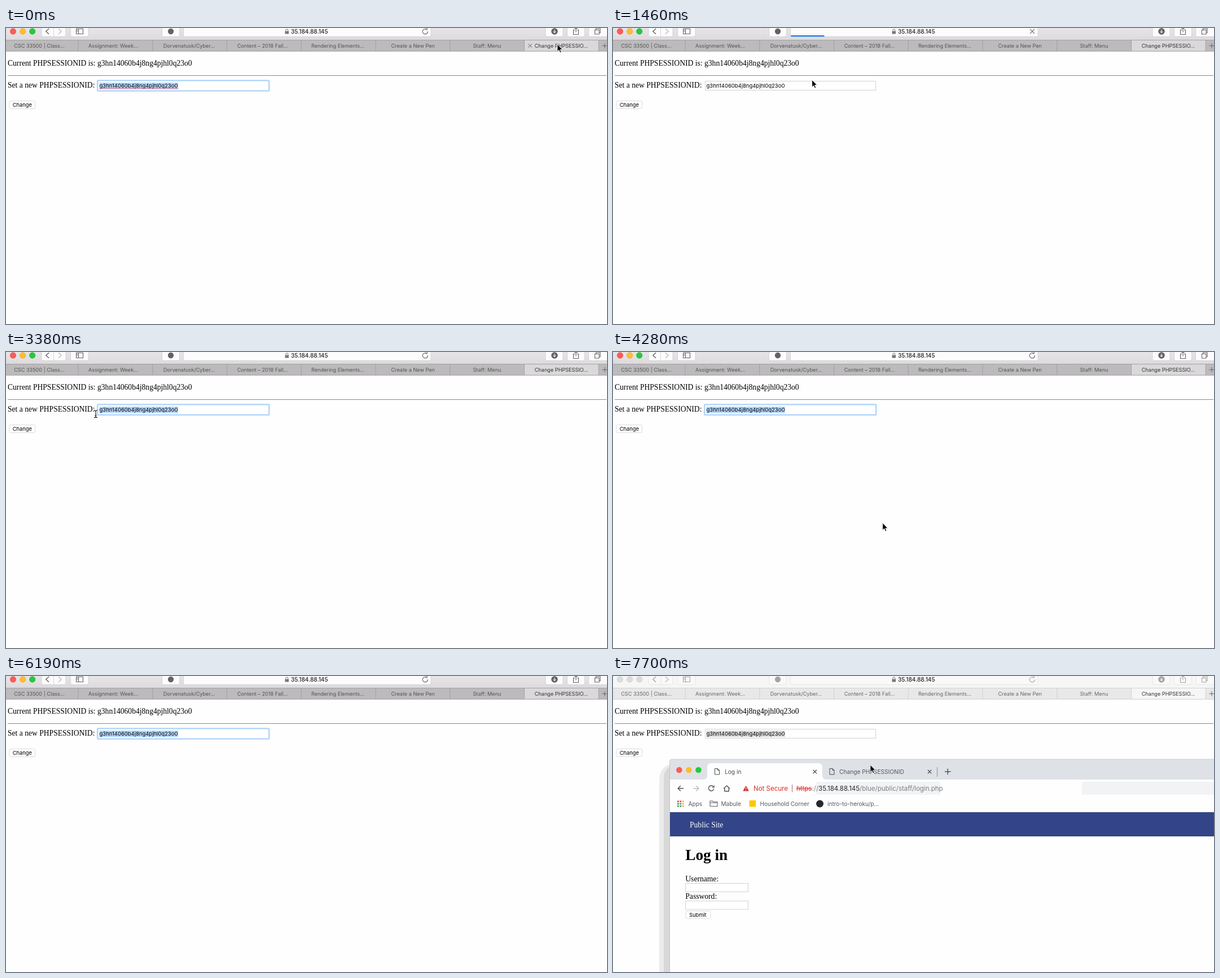
An HTML page for the animation above (8 s loop, 1065 by 526 pixels).

```html
<!DOCTYPE html>
<html lang="en">
<head>
<meta charset="utf-8">
<title>Session change</title>
<style>
  html, body { margin: 0; width: 100%; height: 100%; overflow: hidden; background: #fefefe; }
  svg { display: block; --tool: url(#toolbar); --tab: #bcbabc; --active: #dad8da; --edge: #a09ea0;
        --btn: #fcfcfc; --btnEdge: #cfcdcf; --icon: #626262; --tabText: #555; --sel: #b3d7ff; }
  svg.idle { --tool: #f6f6f6; --tab: #e9e8e9; --active: #f6f6f6; --edge: #cfcecf;
             --btn: #f9f9f9; --btnEdge: #e2e2e2; --icon: #a4a4a4; --tabText: #666; --sel: #dcdcdc; }
  .idle .lights circle { fill: #dcdcdc; stroke: #cacaca; }
  text { white-space: pre; }
  .ui { font-family: Inter, "Noto Sans", sans-serif; }
  .page { font: 13.6px "Liberation Serif", "Times New Roman", serif; }
  .tabs text { font-size: 9.15px; fill: var(--tabText); text-anchor: middle; }
  .tabs text.on { fill: #333; }
  .small { font-size: 9.3px; }
  .btn { fill: var(--btn); stroke: var(--btnEdge); stroke-width: .8; }
  .icon { fill: none; stroke: var(--icon); stroke-width: 1.1; }
  .dark { fill: none; stroke: #505357; stroke-width: 1.4; }
  .box { fill: #fff; stroke: #d2d2d2; }
</style>
</head>
<body>
<svg id="stage" width="1065" height="526" viewBox="0 0 1065 526">
  <defs>
    <linearGradient id="toolbar" x2="0" y2="1">
      <stop stop-color="#e7e5e7"/><stop offset="1" stop-color="#dcdadc"/>
    </linearGradient>
    <path id="doc" d="M.5 .5h5l3 3v7.5h-8zM5.5 .5v3h3" fill="none" stroke="#45484c"/>
    <path id="cross" d="M-3.2-3.2 3.2 3.2M3.2-3.2-3.2 3.2"/>
  </defs>

  <rect width="1065" height="526" fill="#fefefe"/>
  <rect width="1065" height="21" fill="var(--tool)"/>
  <g class="lights" stroke-width=".6">
    <circle cx="12.5" cy="6" r="5.2" fill="#fc5b57" stroke="#e2463f"/>
    <circle cx="29.7" cy="6" r="5.2" fill="#fdbc2f" stroke="#e1a116"/>
    <circle cx="46.7" cy="6" r="5.2" fill="#28c840" stroke="#1aab29"/>
  </g>
  <g id="buttons"></g>
  <g class="icon">
    <path d="M76 1.2 70.8 6 76 10.8" stroke-width="1.4"/>
    <path d="M93 1.2 98.2 6 93 10.8" stroke="#bbb" stroke-width="1.3"/>
    <path d="M84.5 -2V15" stroke="var(--btnEdge)" stroke-width=".8"/>
    <path d="M124.5 1.5h12v9h-12zM128.5 1.5v9M125.5 4h2M125.5 6h2"/>
    <circle cx="292" cy="6" r="4.6" fill="var(--icon)"/>
    <circle cx="972" cy="6" r="5.2" fill="var(--icon)"/>
    <path d="M972 3v5M969.7 6l2.3 2.5 2.3-2.5" stroke="#fff"/>
    <path d="M1008 3.5h-2.5v8h9v-8H1012M1010 7.5V-1M1007.5 1.5 1010-1l2.5 2.5"/>
    <path d="M1043.5 3.5h7.5v7.5h-7.5zM1045.5 3V1h7.5v7.5h-2"/>
  </g>
  <path d="M494.5 5.5h6.5v5h-6.5z" fill="#777"/>
  <path d="M495.8 5.5v-1.5a2 2 0 0 1 4 0v1.5" fill="none" stroke="#777"/>
  <text class="ui" x="505" y="10" font-size="10.1" font-weight="500" fill="#222">35.184.88.145</text>
  <path id="reload" class="icon" d="M745.6 2.7a4.6 4.6 0 1 0 1.8 3.3M743 2.8h3.2V-.2" stroke="#777"/>
  <use id="stop" href="#cross" x="743" y="6" transform="translate(-185.75 -1.5) scale(1.25)" stroke="#777" stroke-width=".9"/>
  <rect id="progress" x="315" y="13" height="2.3" rx="1" fill="#1a7cf0"/>

  <g id="tabs" class="ui tabs"></g>

  <g class="page">
    <text x="3" y="67">Current PHPSESSIONID is: g3hn14060b4j8ng4pjhl0q23o0</text>
    <path d="M3 84.5H1064" stroke="#8b8b8b"/>
    <text x="3" y="106">Set a new PHPSESSIONID:</text>
  </g>
  <rect id="ring" x="162.2" y="93.2" width="304" height="18.6" rx="1.5" fill="#fff" stroke="#b4d6fa" stroke-width="2.6"/>
  <rect id="field" class="box" x="163.5" y="94.5" width="302" height="16"/>
  <rect id="selection" y="97" height="11.5" fill="var(--sel)"/>
  <text class="ui" x="165.5" y="106.2" font-size="9.48">g3hn14060b4j8ng4pjhl0q23o0</text>
  <path id="spelling" d="M166 107.7H305" stroke="#e5484d" stroke-width="1.3" stroke-dasharray="1.6 1"/>
  <path id="caret" d="M305.5 97v11.5" stroke="#000"/>
  <g class="ui small">
    <rect class="box" x="5.8" y="129.5" width="45.7" height="14" rx="2.5" stroke-width=".8"/>
    <text x="11.7" y="140.2">Change</text>
  </g>

  <g id="login">
    <rect x="82" y="156" width="1100" height="500" rx="26" fill="#ebebeb"/>
    <rect x="90" y="158" width="1100" height="500" rx="22" fill="#d8d8d8"/>
    <rect x="100.5" y="148" width="1000" height="420" rx="4" fill="#dee1e6" stroke="#bfc1c4" stroke-width=".8"/>
    <path d="M101 184h59q7 0 7-7v-15q0-7 7-7h190q7 0 7 7v15q0 7 7 7h687v58H101z" fill="#fefefe"/>
    <circle cx="117.3" cy="167" r="5.3" fill="#fc5b57"/>
    <circle cx="134.4" cy="167" r="5.3" fill="#fdbc2f"/>
    <circle cx="151.4" cy="167" r="5.3" fill="#28c840"/>
    <use href="#doc" x="180" y="164"/>
    <use href="#doc" x="383.5" y="164"/>
    <g stroke="#505357" stroke-width="1.3">
      <use href="#cross" x="357.7" y="170"/>
      <use href="#cross" x="561" y="170"/>
      <path d="M588 170h10.5M593.2 164.8v10.5" stroke-width="1.5"/>
    </g>
    <path d="M574.5 162v17" stroke="#8f9296"/>
    <g class="ui" font-size="10.2" fill="#55585c">
      <text x="198" y="173.6" fill="#45484c">Log in</text>
      <text x="401" y="173.6">Change PHPSESSIONID</text>
    </g>
    <rect id="hoverRight" x="831" y="188" width="234" height="23" fill="#f1f3f4"/>
    <rect id="hoverLeft" x="360" y="188" width="220" height="23" fill="#f1f3f4"/>
    <g class="dark">
      <path d="M125 199.7h-9.5M119.8 195l-4.7 4.7 4.7 4.7"/>
      <path d="M142 199.7h9.5M147.2 195l4.7 4.7-4.7 4.7" stroke="#b9bbbe"/>
      <path d="M177.7 196.5a4.7 4.7 0 1 0 .9 4.3M179 194.5v3.4h-3.5"/>
      <path d="M196 200l5.5-5 5.5 5M197.8 199v5.7h7.4V199"/>
    </g>
    <path d="M235.5 195l5.3 9.5h-10.6z" fill="#d32f27"/>
    <path d="M235.5 198.2v3M235.5 202.2v1.2" stroke="#fff"/>
    <path d="M317.5 193v13.5" stroke="#a9696a"/>
    <g class="ui" font-size="11.5">
      <text x="249" y="204" fill="#d32f27">Not Secure</text>
      <text x="325" y="204" fill="#7b7f84"><tspan fill="#d32f27" text-decoration="line-through">https</tspan>://<tspan fill="#25272a">35.184.88.145</tspan>/blue/public/staff/login.php</text>
    </g>
    <g id="apps"></g>
    <path d="M172 222h4.5l1.5 1.8h7v7.7h-13zM172 225.3h13" fill="none" stroke="#5f6368" stroke-width="1.1"/>
    <rect x="241.5" y="221" width="11.5" height="11.5" fill="#fbc800"/>
    <circle cx="366.5" cy="227" r="6.5" fill="#24292e"/>
    <g class="ui" font-size="10.1" fill="#55585c">
      <text x="133.5" y="230.5">Apps</text>
      <text x="191.5" y="230.5">Mabule</text>
      <text x="260.5" y="230.5">Household Corner</text>
      <text x="380" y="230.5">intro-to-heroku/p...</text>
    </g>
    <path d="M101 242h964v284H101z" fill="#fefefe"/>
    <path d="M101 242h964v43H101z" fill="#334488"/>
    <g class="page">
      <text x="136" y="268.7" fill="#fff">Public Site</text>
      <text x="128.3" y="327" font-weight="bold" style="font-size:27.2px">Log in</text>
      <text x="128.3" y="364.5">Username:</text>
      <text x="128.3" y="396">Password:</text>
    </g>
    <rect class="box" x="128.5" y="368.5" width="111" height="15"/>
    <rect class="box" x="128.5" y="399.8" width="111" height="15"/>
    <rect class="box" x="128.8" y="417.5" width="44" height="13.3" rx="2.5" stroke-width=".8"/>
    <text class="ui small" x="135" y="427.7">Submit</text>
  </g>

  <path id="arrow" d="M0 0V12.8L2.9 10 5 14.8 7 13.9 5 9.3H9z" stroke="#fff" stroke-width=".8"/>
  <path id="beam" d="M-3-6.5q3 0 3 2v9q0 2-3 2M3-6.5q-3 0-3 2v9q0 2 3 2M-1.5 2.5h3" fill="none" stroke="#111" stroke-width="1.1"/>
</svg>
<script>
const LOOP = 8000, STEP = 147.4;
const $ = id => document.getElementById(id);
const show = (id, on) => $(id).style.display = on ? "" : "none";

$("buttons").innerHTML = [[63, 43], [114.5, 31.5], [276.5, 31], [314.5, 438.5], [956, 31], [994.5, 31], [1032.5, 40]]
  .map(([x, w]) => `<rect class="btn" x="${x}" y="-6" width="${w}" height="21.3" rx="3"/>`).join("");

const tabs = [
  ["CSC 33500 | Class...", 59], ["Assignment: Week...", 190], ["Dorvenatusk/Cyber...", 324.5],
  ["Content – 2018 Fall...", 454.5], ["Rendering Elements...", 588], ["Create a New Pen", 721.2],
  ["Staff: Menu", 852.5], ["Change PHPSESSIO...", 984]
];
const edge = i => 128 + 131.75 * i;
$("tabs").innerHTML = `
  <rect y="21" width="1065" height="20.5" fill="var(--tab)"/>
  <rect x="${edge(6)}" y="21" width="131.75" height="20.5" fill="var(--active)"/>
  <path d="M0 21.5H1065M0 41.2H1065" stroke="var(--edge)" stroke-width=".9"/>` +
  tabs.map(([name, x], i) => `
    <path d="M${edge(i)} 21v20" stroke="var(--edge)" stroke-width=".9"/>
    <text x="${x}" y="34.8" class="${i == 7 ? "on" : ""}">${name}</text>`).join("") + `
  <path d="M1056.5 31.5h9M1061 27v9" stroke="#666"/>
  <use id="tabClose" href="#cross" x="928.7" y="31.5" stroke="#555"/>`;

const dots = ["#e8453c", "#e8453c", "#f5b32b", "#34a853", "#4285f4", "#f5b32b", "#34a853", "#34a853", "#f5b32b"];
$("apps").innerHTML = dots.map((c, i) =>
  `<rect x="${114 + i % 3 * 4.4}" y="${221.5 + (i / 3 | 0) * 4.2}" width="2.8" height="2.8" fill="${c}"/>`).join("");

// time, x, y
const pointer = [
  [0, 977, 29], [150, 965, 28], [590, 744, 6], [890, 742, 6], [1170, 570, 52], [1320, 420, 84], [1470, 353, 92],
  [1770, 325, 107], [2050, 322, 109], [2800, 322, 109], [3390, 159, 110], [3690, 159, 110],
  [3840, 205, 136], [4275, 478, 304], [4570, 720, 430], [4720, 850, 465], [4870, 901, 457],
  [5160, 930, 385], [5460, 1000, 293], [5750, 1030, 380], [6040, 1058, 457], [6190, 1075, 470],
  [6500, 1075, 240], [6640, 1030, 215], [6930, 835, 195], [7080, 564, 211],
  [7230, 520, 208], [7370, 440, 190], [7520, 400, 166], [7665, 456, 158], [8000, 456, 158]
];
const loading = [[1030, 20], [1170, 34], [1320, 46], [1470, 56], [1900, 438], [2060, 438]];

function at(keys, t) {
  const i = Math.max(1, keys.findIndex(k => k[0] >= t));
  const a = keys[i - 1], b = keys[i];
  const p = Math.min(1, Math.max(0, (t - a[0]) / (b[0] - a[0])));
  return a.slice(1).map((v, j) => v + (b[j + 1] - v) * p);
}

function draw(now) {
  const t = Math.floor((now % LOOP + 20) / STEP) * STEP;
  const [x, y] = at(pointer, t);
  const idle = t > 6300, first = t < 1170, focused = !idle && (first || t > 2480);
  const busy = t > 1020 && t < 2050;
  $("stage").classList.toggle("idle", idle);
  show("login", idle);
  show("hoverRight", t > 6600);
  show("hoverLeft", t > 7050);
  show("tabClose", t < 200);
  show("ring", focused);
  show("field", !focused);
  show("spelling", first);
  show("caret", t > 2480 && t < 2820);
  show("reload", !busy);
  show("stop", busy);
  show("progress", busy);
  if (busy) $("progress").setAttribute("width", at(loading, t)[0]);

  const dragging = t > 2480 && t < 3800;
  const left = dragging ? Math.min(305, Math.max(165.5, x)) : 165.5;
  show("selection", first || t > 2480);
  $("selection").setAttribute("x", left);
  $("selection").setAttribute("width", 305 - left);

  const beam = t > 1700 && t < 3800;
  show("beam", beam);
  show("arrow", !beam);
  $(beam ? "beam" : "arrow").setAttribute("transform", `translate(${x} ${y})`);
}

const start = performance.now();
(function tick() {
  draw(performance.now() - start);
  requestAnimationFrame(tick);
})();
</script>
</body>
</html>
```
